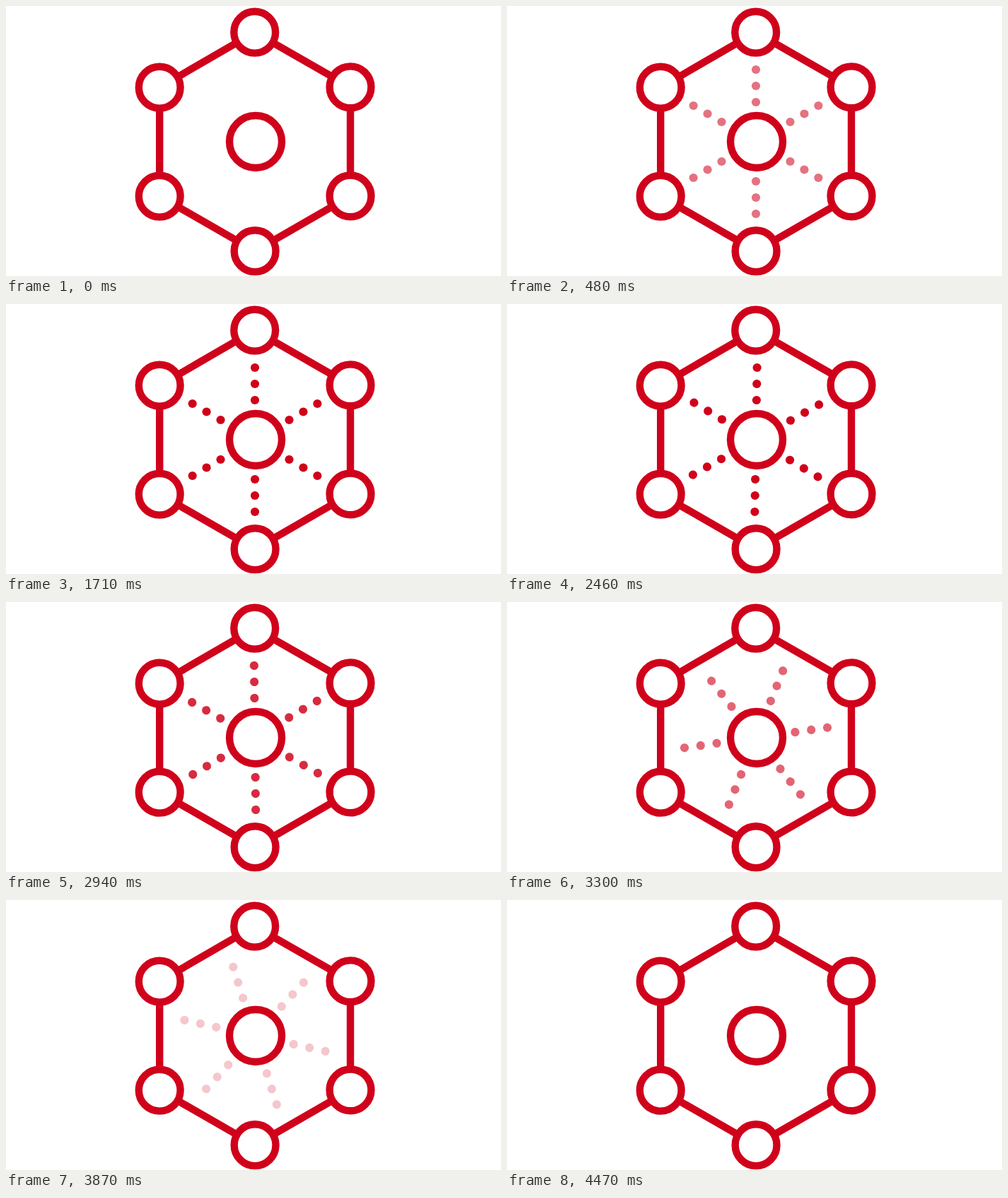
Animation, 700 px wide and 382 px high, one loop 4500 ms. Source, as an HTML page:

```html
<!DOCTYPE html>
<html lang="en">
<head>
<meta charset="utf-8">
<style>
  html, body { margin: 0; width: 100%; height: 100%; overflow: hidden; background: #fff; }
  svg { display: block; }
  .ring { fill: #fff; stroke: #d0021b; stroke-width: 10.4; }
  #edges { fill: none; stroke: #d0021b; stroke-width: 10.4; }
  #spokes { fill: #d0021b; }
</style>
</head>
<body>
<svg width="700" height="382" viewBox="0 0 700 382">
  <polygon id="edges"/>
  <g id="nodes"></g>
  <circle class="ring" cx="353" cy="192" r="37"/>
  <g id="spokes"></g>
</svg>
<script>
const LOOP = 4500, FADE_IN_END = 900, SPIN_START = 2400;
const CENTER = { x: 352, y: 192 };
const NODES = [[351.7, 37.2], [487, 114.8], [487, 268.9], [352.1, 346.7], [217.2, 269.2], [217.2, 115.2]];
const get = id => document.getElementById(id);
const spokes = get('spokes');

function addCircle(parent, cx, cy, r, className) {
  const circle = document.createElementNS('http://www.w3.org/2000/svg', 'circle');
  const attrs = { cx, cy, r, class: className };
  for (const name in attrs) circle.setAttribute(name, attrs[name]);
  parent.append(circle);
}

get('edges').setAttribute('points', NODES.join(' '));
NODES.forEach(([x, y], i) => {
  addCircle(get('nodes'), x, y, 29.4, 'ring');
  const angle = i * Math.PI / 3;
  for (const dist of [56, 79, 102]) {
    addCircle(spokes, CENTER.x + dist * Math.sin(angle), CENTER.y - dist * Math.cos(angle), 6.1, 'dot');
  }
});

// Eased progress from 0 to 1 between two times
function ease(time, start, end) {
  const p = Math.min(1, Math.max(0, (time - start) / (end - start)));
  return p * p * (3 - 2 * p);
}

function draw() {
  const time = performance.now() % LOOP;
  const spin = ease(time, SPIN_START, LOOP);
  spokes.setAttribute('opacity', ease(time, 0, FADE_IN_END) * (1 - spin));
  spokes.setAttribute('transform', `rotate(${360 * spin} ${CENTER.x} ${CENTER.y})`);
  requestAnimationFrame(draw);
}
draw();
</script>
</body>
</html>
```
